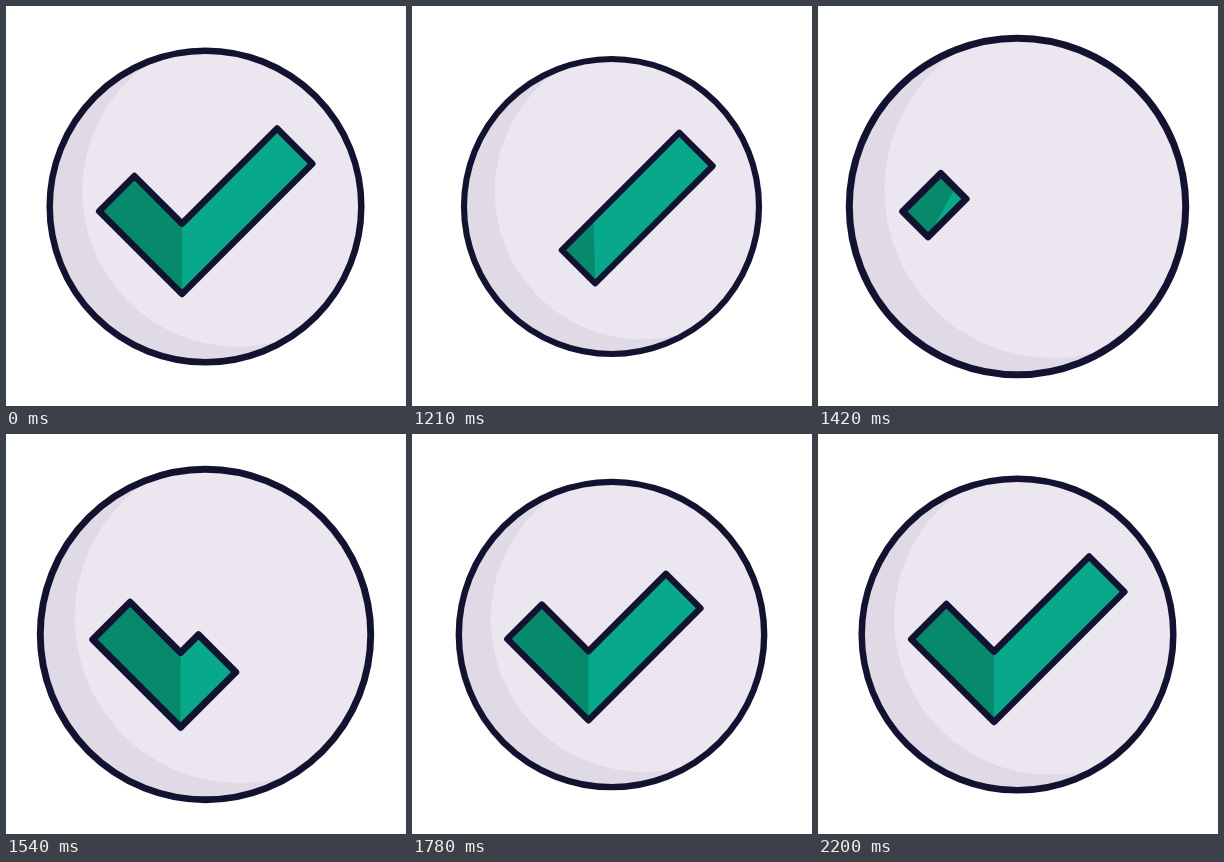
Animation of 400 by 400 pixels, one loop 2.23 s. Source, as an HTML page with a canvas:

```html
<!DOCTYPE html>
<html lang="en">
<head>
<meta charset="utf-8">
<title>Check mark</title>
<style>
  html, body { margin: 0; width: 100%; height: 100%; overflow: hidden; background: #fff; }
  canvas { display: block; width: 400px; height: 400px; }
</style>
</head>
<body>
<canvas id="stage"></canvas>
<script>
const LOOP = 2230, REST = 1030, STEP = 30;
const CX = 199.5, CY = 200.5, RADIUS = 155.8, LINE = 6.5;
const INK = '#121331', DISC = '#ebe6ef', SHADE = '#e0dae6', GREEN = '#08a88a', DEEP = '#078a6b';

const canvas = document.getElementById('stage');
const ctx = canvas.getContext('2d');
const dpr = window.devicePixelRatio || 1;
canvas.width = canvas.height = 400 * dpr;

// Corners of the full check mark, built from the bottom point along the diagonals.
const WIDTH = 35.2, LEFT = 82.8, RIGHT = 130.3;
const bottom = [176, 288];
const inner = [176, 288 - 2 * WIDTH];
const leftLow = [176 - LEFT, 288 - LEFT];
const leftHigh = [leftLow[0] + WIDTH, leftLow[1] - WIDTH];
const rightLow = [176 + RIGHT, 288 - RIGHT];
const rightHigh = [rightLow[0] - WIDTH, rightLow[1] - WIDTH];
const elbowLeft = [176 - WIDTH, 288 - WIDTH];
const elbowRight = [176 + WIDTH, 288 - WIDTH];

const clamp = v => Math.min(1, Math.max(0, v));
const progress = (t, from, to) => clamp((t - from) / (to - from));
const smooth = u => u * u * (3 - 2 * u);
const mix = (a, b, u) => a + (b - a) * u;
const move = (p, q, u) => [mix(p[0], q[0], u), mix(p[1], q[1], u)];

const scaleKeys = [[1000, 1], [1175, 0.94], [1440, 1.082], [1778, 0.98], [2200, 1]];

function scaleAt(t) {
  let value = 1;
  for (let i = 1; i < scaleKeys.length; i++) {
    const [from, a] = scaleKeys[i - 1], [to, b] = scaleKeys[i];
    if (t >= from) value = mix(a, b, smooth(progress(t, from, to)));
  }
  return value;
}

// Order: left low, left high, inner, right high, right low, bottom.
function checkAt(t) {
  if (t < 1201) {
    const u = Math.pow(progress(t, 1000, 1201), 1.7);
    return [move(leftLow, elbowLeft, u), move(leftHigh, inner, u), inner, rightHigh, rightLow, bottom];
  }
  if (t < 1388) {
    const u = progress(t, 1201, 1388);
    const fold = move(inner, rightHigh, u);
    return [move(elbowLeft, rightHigh, u), fold, fold, rightHigh, rightLow, move(bottom, rightLow, u)];
  }
  if (t < 1501) {
    const u = progress(t, 1388, 1501);
    const fold = move(leftHigh, inner, u);
    return [leftLow, leftHigh, fold, fold, move(leftHigh, elbowRight, u), move(leftLow, bottom, u)];
  }
  const u = 1 - Math.pow(1 - progress(t, 1501, 2140), 3.1);
  return [leftLow, leftHigh, inner, move(inner, rightHigh, u), move(elbowRight, rightLow, u), bottom];
}

function polygon(points) {
  ctx.beginPath();
  points.forEach(([x, y]) => ctx.lineTo(x, y));
  ctx.closePath();
}

function circle(x, y) {
  ctx.beginPath();
  ctx.arc(x, y, RADIUS, 0, Math.PI * 2);
}

function fill(color) {
  ctx.fillStyle = color;
  ctx.fill();
}

function drawDisc() {
  circle(CX, CY);
  fill(SHADE);
  ctx.save();
  ctx.clip();
  circle(CX + 32.5, CY - 15.5);
  fill(DISC);
  ctx.restore();
  circle(CX, CY);
  ctx.stroke();
}

function drawCheck(points) {
  const [low, high, fold, , , base] = points;
  polygon(points);
  fill(GREEN);
  polygon([low, high, fold, base]);
  fill(DEEP);
  polygon(points);
  ctx.stroke();
}

function draw(t) {
  const s = scaleAt(t);
  ctx.setTransform(dpr, 0, 0, dpr, 0, 0);
  ctx.fillStyle = '#fff';
  ctx.fillRect(0, 0, 400, 400);
  ctx.translate(CX, CY);
  ctx.scale(s, s);
  ctx.translate(-CX, -CY);
  ctx.strokeStyle = INK;
  ctx.lineWidth = LINE;
  ctx.lineJoin = 'round';
  drawDisc();
  drawCheck(checkAt(t));
}

const start = performance.now();
function tick() {
  const t = (performance.now() - start) % LOOP;
  draw(t < REST ? 0 : REST + Math.floor((t - REST) / STEP) * STEP);
  requestAnimationFrame(tick);
}
tick();
</script>
</body>
</html>
```
